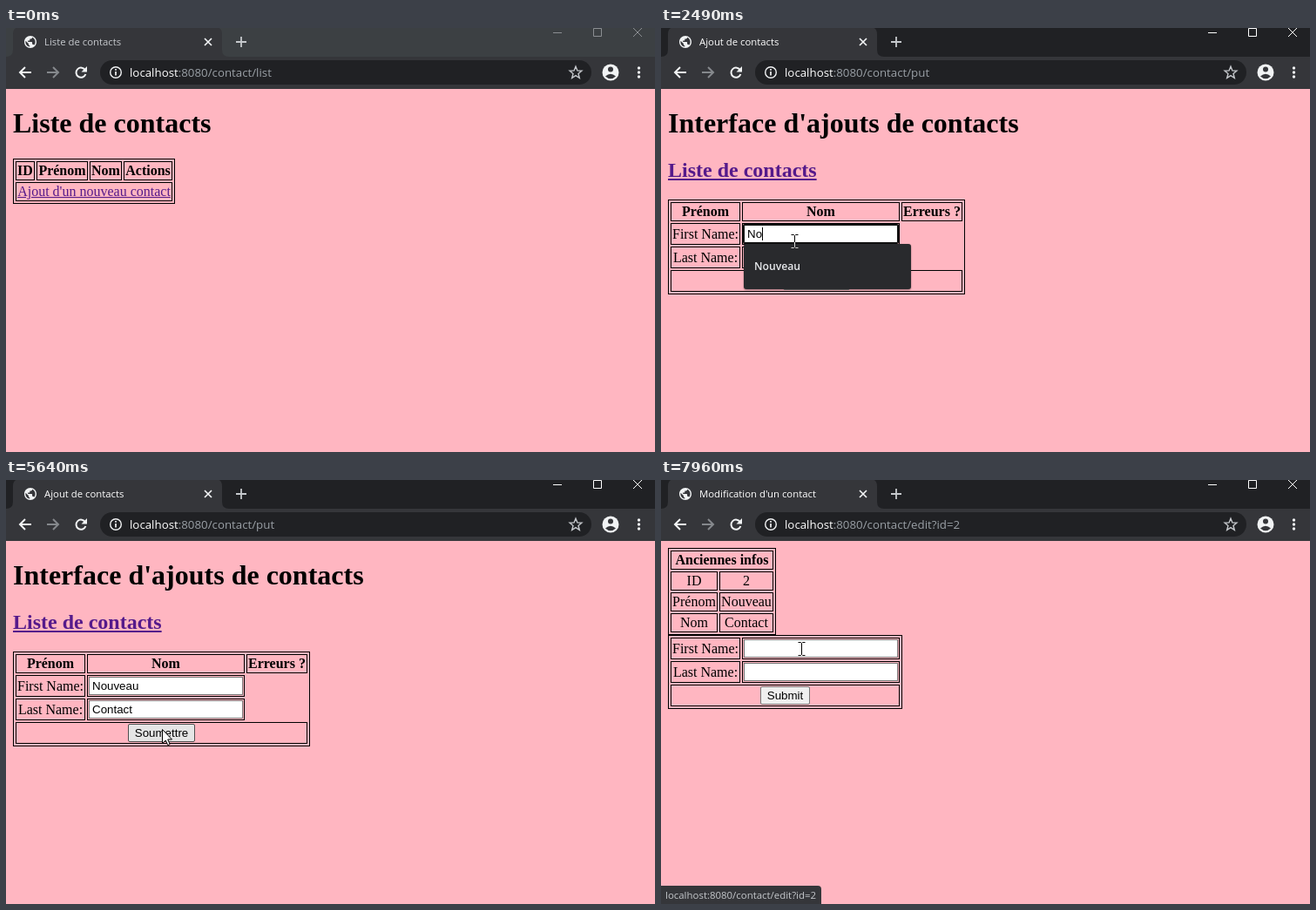
An HTML page that plays this animation: 745 px wide and 487 px high, repeating every 7990 ms.

```html
<!DOCTYPE html>
<html lang="fr">
<head>
<meta charset="utf-8">
<title>Contacts</title>
<style>
html, body { margin: 0; width: 100%; height: 100%; overflow: hidden; background: #ffb6c1; }
#stage { position: absolute; left: 0; top: 0; width: 745px; height: 487px; overflow: hidden; background: #ffb6c1;
  font: 16px/18px "Liberation Serif", "Times New Roman", serif; color: #000; --strip: #202124; --title: #fff; --control: #fff; }
#stage.inactive { --strip: #3c4043; --title: #c6c9cd; --control: #8b8e92; }
#stage * { box-sizing: border-box; }
svg { position: absolute; left: 0; top: 0; overflow: visible; }
.ui { position: absolute; white-space: pre; font-family: "Open Sans", "Noto Sans", sans-serif; }
#title { left: 44px; top: 7px; font-size: 11.35px; color: var(--title); }
#url { left: 142px; top: 42px; font-size: 13.3px; color: #9aa0a6; }
#url b { font-weight: 400; color: #fff; }
#status { left: 0; top: 466px; height: 21px; padding: 0 6px 0 5px; border-radius: 0 4px 0 0; background: #35363a;
  color: #c4c7cb; font-size: 11.45px; line-height: 21px; }
.page { display: none; }
.page.shown { display: block; }
.box { position: absolute; display: flex; align-items: center; justify-content: center; white-space: pre; }
.cell { border: 1px solid #000; }
.th, h1, h2 { font-weight: 700; }
h1, h2 { position: absolute; left: 8px; margin: 0; white-space: nowrap; }
h1 { top: 91px; font-size: 32px; line-height: 37px; }
h2 { top: 150px; font-size: 24px; line-height: 27px; }
.link { text-decoration: underline; color: #00e; }
.visited { color: #551a8b; }
[data-press=add] .add, [data-press=back] .back, [data-press=edit] .edit { color: #f00; }
.field, .button { font: 13.333px/19px "Liberation Sans", Arial, sans-serif; border: 1px solid #767676; }
.field { justify-content: flex-start; padding-left: 3px; background: #fff; }
.field.focus { border-color: #101010; box-shadow: 0 0 0 1px #101010; border-radius: 1px; }
.caret { width: 1px; height: 15px; margin-right: -1px; background: #000; visibility: hidden; }
.button { background: #efefef; border-radius: 2px; }
.button.hover { background: #e5e5e5; border-color: #4f4f4f; }
[data-press=submit] .button { background: #f5f5f5; border-color: #8d8d8d; }
#menu { left: 95px; width: 192px; padding: 8px 12px; background: #292a2d; border-radius: 3px; box-shadow: 0 1px 2px #0006;
  color: #e8eaed; font-size: 12.2px; font-weight: 600; line-height: 36px; }
#beam { mix-blend-mode: difference; }
</style>
</head>
<body>
<div id="stage">
  <svg width="745" height="70" fill="none">
    <path fill="var(--strip)" d="M0 0H745V33H0Z"/>
    <path fill="#35363a" d="M0 33H745V70H0ZM0 33Q8 33 8 25V7Q8-1 16-1H240Q248-1 248 7V25Q248 33 256 33Z"/>
    <rect x="108" y="37" width="564" height="28" rx="14" fill="#202124"/>
    <g id="globe"><path fill="#f1f3f4" transform="scale(.7) translate(-12 -12)" d="M12 2C6.48 2 2 6.48 2 12s4.48 10 10 10 10-4.48 10-10S17.52 2 12 2zm-1 17.93c-3.95-.49-7-3.85-7-7.93 0-.62.08-1.21.21-1.79L9 15v1c0 1.1.9 2 2 2v1.93zm6.9-2.54c-.26-.81-1-1.39-1.9-1.39h-1v-3c0-.55-.45-1-1-1H8v-2h2c.55 0 1-.45 1-1V7h2c1.1 0 2-.9 2-2v-.41c2.93 1.19 5 4.06 5 7.41 0 2.08-.8 3.97-2.1 5.39z"/></g>
    <g stroke="#f1f3f4" stroke-width="1.7">
      <path d="M228 12l8 8m0-8l-8 8"/>
      <path stroke-width="2" d="M29 51H16.500M22 45L16 51L22 57"/>
      <path stroke-width="2" d="M91 48.500A5.600 5.600 0 1 0 91.400 53"/>
      <path stroke="none" fill="#f1f3f4" d="M93 44V50.500H86.500Z"/>
      <circle cx="126" cy="51" r="6.300" stroke-width="1.400"/>
      <path d="M126 50V54.500M126 47V48.700"/>
    </g>
    <path stroke="#c6c9cd" stroke-width="1.800" d="M264 16H276M270 10V22"/>
    <path stroke="#85888c" stroke-width="2" d="M47 51H60M54 45L60 51L54 57"/>
    <path id="star" stroke="#c6c9cd" stroke-width="1.400"/>
    <circle cx="694" cy="51" r="9.500" fill="#f1f3f4"/>
    <circle cx="694" cy="47.500" r="3" fill="#35363a"/>
    <path fill="#35363a" d="M688 55.500Q694 50 700 55.500Q694 61 688 55.500Z"/>
    <path stroke="#f1f3f4" stroke-width="3.400" stroke-linecap="round" d="M726.500 46h.01m-.01 5h.01m-.01 5h.01"/>
    <path stroke="var(--control)" d="M628 5.500H638M674.500 .5H683.500V9.500H674.500ZM720 0L730 10M730 0L720 10"/>
  </svg>
  <div id="title" class="ui"></div>
  <div id="url" class="ui"><b>localhost</b><span>:8080/contact/</span><span id="path"></span></div>
  <div id="pages"></div>
  <div id="menu" class="ui"></div>
  <div id="status" class="ui"></div>
  <svg id="spot" width="1" height="1"><circle r="11" fill="#ffd51fb8"/></svg>
  <svg id="arrow" class="cursor" width="1" height="1"><path fill="#fff" stroke="#000" d="M.5 .5V16.500L4.300 13L6.800 18.600L9.200 17.500L6.700 12H11.500Z"/></svg>
  <svg id="hand" class="cursor" width="1" height="1"><g transform="translate(-6)" stroke="#000">
    <path fill="#fff" d="M5 1.500Q6.500-.5 8 1.500V7Q9.500 5.800 11 7.300Q12.500 6.500 13.800 8Q15.500 7.400 16.500 9.500V14Q16.500 17 15 19V21.500H7V19.500L1 12.800Q0 10.500 2 10.300Q3.500 10.500 5 12.500Z"/>
    <path fill="none" d="M8 7V11M11 7.500V11M13.800 8.500V11.500"/></g></svg>
  <svg id="beam" class="cursor" width="1" height="1"><path fill="none" stroke="#fff" d="M-3.500-7.500h3l1 1l1-1h3M.5-6.500V6.500M-3.500 7.500h3l1-1l1 1h3"/></svg>
</div>
<script>
const LOOP = 7990;
const $ = id => document.getElementById(id);

// Page building
const box = (x, y, w, h, cls, html = '') =>
  `<div class="box ${cls}" style="left:${x}px;top:${y}px;width:${w}px;height:${h}px">${html}</div>`;
// Each column is [left, right].
const row = (y, h, cols, texts, cls = '') =>
  cols.map(([l, r], i) => box(l, y, r - l, h, 'cell ' + cls, texts[i])).join('');
const frame = (y, right, bottom) => box(8, y, right - 8, bottom - y, 'cell');
const field = (y, id = '') =>
  box(95, y, 177, 21, 'field ' + id, '<span></span><i class="caret"></i>');
const link = (text, cls) => `<span class="link ${cls}">${text}</span>`;

const add = link("Ajout d'un nouveau contact", 'visited add');
const heads = ['ID', 'Prénom', 'Nom', 'Actions'];
const emptyCols = [[11, 33], [35, 94], [96, 133], [135, 191]];
const fullCols = [[11, 33], [35, 97], [99, 153], [155, 288]];
const formCols = [[11, 91], [93, 274]];
const infoCols = [[11, 65], [67, 129]];
const formRows = y => row(y, 25, formCols, ['First Name:', '']) + row(y + 27, 25, formCols, ['Last Name:', '']);

const pages = {
  empty: { title: 'Liste de contacts', path: 'list', html: '<h1>Liste de contacts</h1>' + frame(150, 194, 202) +
    row(153, 22, emptyCols, heads, 'th') + row(177, 22, [[11, 191]], [add]) },
  put: { title: 'Ajout de contacts', path: 'put', html: "<h1>Interface d'ajouts de contacts</h1><h2>" +
    link('Liste de contacts', 'visited back') + '</h2>' + frame(197, 349, 306) +
    row(200, 22, [...formCols, [276, 346]], ['Prénom', 'Nom', 'Erreurs ?'], 'th') +
    formRows(224) + row(278, 25, [[11, 346]], ['']) +
    field(226, 'first') + field(253, 'last') + box(140, 280, 77, 21, 'button', 'Soumettre') },
  full: { title: 'Liste de contacts', path: 'list', html: '<h1>Liste de contacts</h1>' + frame(150, 291, 226) +
    row(153, 22, fullCols, heads, 'th') +
    row(177, 22, fullCols, ['2', 'Nouveau', 'Contact', link('Modifier', 'edit') + ' ' + link('Supprimer', '')]) +
    row(201, 22, [[11, 288]], [add]) },
  edit: { title: "Modification d'un contact", path: 'edit?id=2', html: frame(78, 132, 178) +
    row(81, 22, [[11, 129]], ['Anciennes infos'], 'th') + row(105, 22, infoCols, ['ID', '2']) +
    row(129, 22, infoCols, ['Prénom', 'Nouveau']) + row(153, 22, infoCols, ['Nom', 'Contact']) +
    frame(178, 277, 263) + formRows(181) + row(235, 25, [[11, 274]], ['']) +
    field(183) + field(210) + box(114, 237, 57, 21, 'button', 'Submit') },
};
for (const name in pages) {
  const el = pages[name].el = document.createElement('div');
  el.className = 'page';
  el.innerHTML = pages[name].html;
  $('pages').append(el);
}
$('star').setAttribute('d', 'M' + Array.from({ length: 10 }, (_, i) => {
  const r = i % 2 ? 3.2 : 7.3, a = i * Math.PI / 5;
  return [654 + r * Math.sin(a), 51.5 - r * Math.cos(a)].map(v => v.toFixed(1));
}).join('L') + 'Z');

// Timeline, in ms
const visits = [[0, 'empty'], [910, 'put'], [6480, 'full'], [7800, 'edit']];
const loads = [910, 5260, 6480, 7800];
const presses = [[0, ''], [760, 'add'], [870, ''], [1400, 'field'], [1460, ''], [5120, 'submit'], [5230, ''],
  [6370, 'back'], [6470, ''], [7600, 'edit'], [7710, '']];
const shapes = [[0, ''], [120, 'arrow'], [620, 'hand'], [1010, 'arrow'], [1240, 'beam'], [4920, 'arrow'],
  [5780, 'beam'], [5900, 'arrow'], [6040, 'hand'], [6930, 'arrow'], [7090, 'hand'], [7860, 'beam']];
const moves = [[120, 600, 490], [680, 54, 189], [960, 54, 189], [1380, 153, 245], [4640, 153, 245],
  [4690, 180, 235], [4820, 180, 235], [5080, 179, 287], [5620, 179, 287], [6150, 94, 169],
  [6870, 94, 169], [7210, 176, 192], [7380, 161, 194]];
const statusFade = [[740, 0], [880, 1], [960, 1], [1080, 0], [6150, 0], [6290, 1], [6450, 1], [6570, 0], [7510, 0], [7650, 1]];
const statusPaths = [[0, 'put'], [2000, 'list'], [7000, 'edit?id=2']];
const menus = [[0, null], [1470, [248, 'aze', 'Nouveau']], [2340, [248, 'Nouveau']], [3030, null],
  [3560, [275, 'Contact']], [4460, null]];
const entries = [
  { el: document.querySelector('.first'), text: 'Nouveau', from: 1420, to: 3230, keys: [2290, 2490, 2670, 2720, 2900, 2970, 3030] },
  { el: document.querySelector('.last'), text: 'Contact', from: 3230, to: 5120, keys: [3560, 3740, 3920, 3970, 4150, 4280, 4460] },
];
const submit = pages.put.el.querySelector('.button');

const at = (table, t) => table.findLast(([time]) => time <= t)[1];
function tween(table, t) {
  const i = table.findIndex(([time]) => time > t);
  if (i < 1) return table.at(i).slice(1);
  const [t0, ...a] = table[i - 1], [t1, ...b] = table[i];
  const p = (t - t0) / (t1 - t0), e = p * p * (3 - 2 * p);
  return a.map((v, k) => v + (b[k] - v) * e);
}

function drawEntry({ el, text, from, to, keys }, t) {
  const typed = keys.filter(k => k <= t).length;
  const focus = t >= from && t < to;
  const lastInput = typed ? keys[typed - 1] : from;
  el.firstChild.textContent = text.slice(0, typed);
  el.lastChild.style.visibility = focus && (t - lastInput) % 1000 < 500 ? 'inherit' : 'hidden';
  el.classList.toggle('focus', focus);
}

function draw(t) {
  const current = at(visits, t), press = at(presses, t), shape = at(shapes, t), menu = at(menus, t);
  $('stage').classList.toggle('inactive', t < 760);
  $('stage').dataset.press = press;
  for (const name in pages) pages[name].el.classList.toggle('shown', name === current);
  $('title').textContent = pages[current].title;
  $('path').textContent = pages[current].path;

  const age = t - (loads.findLast(l => l <= t) ?? -LOOP);
  $('globe').setAttribute('transform', `translate(28 16) scale(${0.75 + 0.25 * Math.min(1, age / 150)})`);

  entries.forEach(e => drawEntry(e, t));
  submit.classList.toggle('hover', t >= 5030 && t < 5710);
  $('menu').style.display = menu ? '' : 'none';
  if (menu) {
    $('menu').style.top = menu[0] + 'px';
    $('menu').textContent = menu.slice(1).join('\n');
  }
  $('status').textContent = 'localhost:8080/contact/' + at(statusPaths, t);
  $('status').style.opacity = t < 740 ? 0 : tween(statusFade, t)[0];

  const [x, y] = tween(moves, Math.max(t, 120)).map(Math.round);
  for (const el of document.querySelectorAll('.cursor, #spot')) {
    el.style.transform = `translate(${x}px, ${y}px)`;
    el.style.display = el.id === shape || (el.id === 'spot' && press) ? '' : 'none';
  }
}

const start = performance.now();
function tick() {
  draw((performance.now() - start) % LOOP);
  requestAnimationFrame(tick);
}
tick();
</script>
</body>
</html>
```
